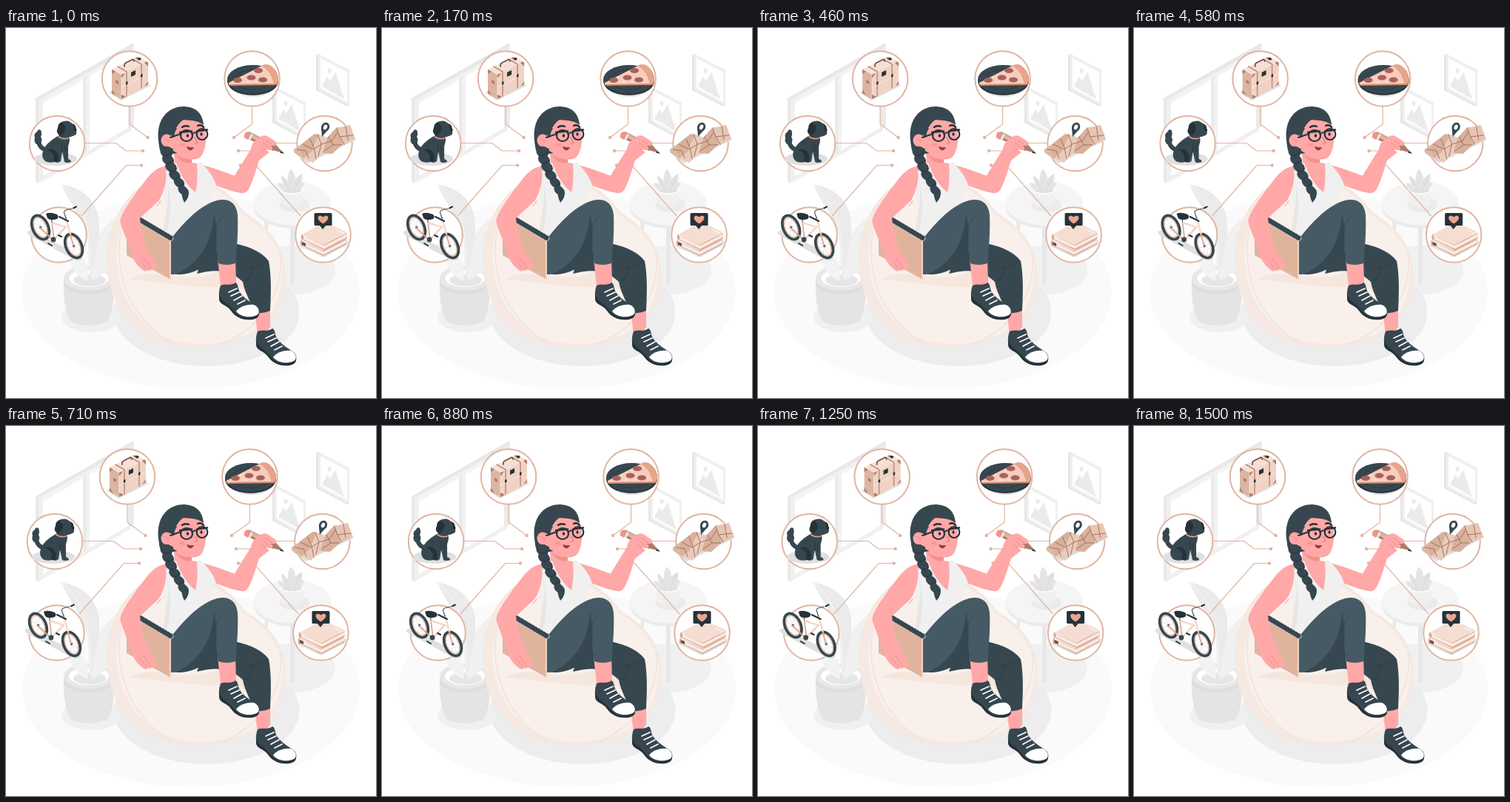
An HTML page that plays this animation: 500 px wide and 500 px high, repeating every 1540 ms.

```html
<!DOCTYPE html>
<html lang="en">
<head>
<meta charset="utf-8">
<title>Daydreaming</title>
<style>
  html, body { margin: 0; width: 100%; height: 100%; overflow: hidden; background: #fff; }
  svg { display: block; width: 100vw; height: 100vh; }
  .line { fill: none; stroke-linecap: round; stroke-linejoin: round; }
  .ring { fill: #fff; stroke: #e0b5a2; stroke-width: 2; }
  .wire { fill: none; stroke: #e0b5a2; stroke-width: 1.2; }
  .skin { fill: #ffa8a7; }
  .dark { fill: #37474f; }
  .ink { fill: #263238; }
  .tan { fill: #e0b49c; }
  .cream { fill: #f5ddd1; }
  .floor { fill: #e0e0e0; }
</style>
</head>
<body>
<svg viewBox="0 0 500 500">
  <defs>
    <g id="picture">
      <path fill="#e6e6e6" d="M419 37l3-2 42 22v48l-3 1-42-22z"/>
      <path fill="#f0f0f0" d="M422 35l42 22v48l-42-22z"/>
      <path fill="#fff" d="M425 41l36 19v40l-36-19z"/>
      <path fill="#ebebeb" d="M427 79l7-13 4 5 7-12 12 37z"/>
      <ellipse fill="#ebebeb" cx="437" cy="58" rx="2.6" ry="3.4"/>
    </g>
    <g id="shoe">
      <path class="dark" d="M290 348c6-3 14 1 20-4c4 1 3 8 6 13c6 9 17 15 24 20c5 7 2 15-7 16.500c-13 1.500-22-3-28-11c-6-9-16-11-17-18c-.5-6 0-12 2-16.500z"/>
      <path class="ink" d="M288 360c2 9 12 12 18 20c7 10 17 13 28 10c4-1 7-3 7.500-6c2 6-3 9-8.500 10c-13 1.500-23-3-29-12c-6-8-15-8-16-15z"/>
      <path fill="#fff" d="M311 383c3-5 13-10 24-9c7 3 9 11 4 14c-9 4-21 3-28-5z"/>
      <path class="line" stroke="#fff" stroke-width="1.800" d="M301 357l11-5M304 362l11-5M308 368l11-6M313 373l10-5"/>
    </g>
    <g id="wheel">
      <ellipse rx="10.500" ry="17" fill="#fff" fill-opacity=".8" stroke="#37474f" stroke-width="3.800"/>
      <ellipse rx="8" ry="14" fill="none" stroke="#e6bfad" stroke-width="1.400"/>
      <path class="line" stroke="#cfd3d5" stroke-width=".5" d="M0-14V14M-8 0H8M-6-10L6 10M6-10L-6 10"/>
      <circle class="dark" r="1.600"/>
    </g>
    <g id="book">
      <path fill="#d3a48f" d="M399 288l29 13 32-16v7l-31 16-30-15z"/>
      <path fill="#fbeae1" d="M401 289l28 13 31-16v4.500l-31 16-28-13z"/>
      <path class="cream" d="M399 287l31-17 30 14-31 17z"/>
      <path class="line" stroke="#c48f78" stroke-width="1" d="M399 287q-2 4 0 7"/>
    </g>
  </defs>

  <!-- room -->
  <ellipse cx="250" cy="356.500" rx="228" ry="131.500" fill="#fafafa"/>
  <g>
    <path fill="#fff" d="M44 96L172 25V134L44 206z"/>
    <path fill="#f3f3f3" d="M40 95L169 23l4 2v6L49 102z"/>
    <path fill="#e8e8e8" d="M40 95l4 2v113l-4-2z"/>
    <path fill="#f0f0f0" d="M44 97l6-3v106l119-67v6L44 210z"/>
    <path fill="#e8e8e8" d="M40 95L170 21l3 1v4L44 97z"/>
    <path fill="#ebebeb" d="M104 66l8-4v104l-8 5z"/>
    <path fill="#f3f3f3" d="M109 64l4-2v104l-4 2z"/>
    <path fill="#ebebeb" d="M165 29l8-4v108l-8 4z"/>
  </g>
  <use href="#picture"/>
  <use href="#picture" x="-59" y="44"/>

  <ellipse cx="388" cy="327" rx="57" ry="33" fill="#f0f0f0"/>
  <ellipse cx="271" cy="384" rx="125.500" ry="73" fill="#ededed"/>
  <ellipse cx="115" cy="391" rx="40" ry="20" fill="#f0f0f0"/>

  <!-- table -->
  <g>
    <path fill="#e8e8e8" d="M350 257h5l-4 54-4-1zM421 256h5l7 48-4 1zM384 262h6v84q-3 2-6 0z"/>
    <path fill="#ebebeb" d="M335 237h104v5c-2 38-102 38-104 0z"/>
    <ellipse cx="387" cy="237" rx="52" ry="29.500" fill="#f5f5f5"/>
    <ellipse cx="390" cy="239" rx="20" ry="10" fill="#ebebeb"/>
    <path fill="#f0f0f0" d="M370 219h33l-2 19c-6 5-23 5-29 0z"/>
    <ellipse cx="386.500" cy="219" rx="16.500" ry="6" fill="#fafafa"/>
    <ellipse cx="386.500" cy="219" rx="13" ry="4" fill="#e0e0e0"/>
    <path fill="#e0e0e0" d="M385 220c-9-5-13-13-13-21c7 4 11 11 13 21zM388 220c-1-12 4-19 12-23c2 10-3 19-12 23z"/>
    <path fill="#e4e4e4" d="M386 221c-7-10-7-23-1-31c8 8 9 21 1 31zM380 220c-9-1-12-6-12-11c6 1 11 5 12 11zM391 220c2-7 6-11 12-12c0 6-5 11-12 12z"/>
  </g>

  <!-- floor plant -->
  <g>
    <path fill="#e4e4e4" d="M78 338c-1 26 2 46 8 57c9 9 43 9 52 0c7-12 9-34 7-57z"/>
    <path fill="#dedede" d="M78 339h67l-1 11c-12 14-52 14-65 0z"/>
    <ellipse cx="111.500" cy="338" rx="33.500" ry="17" fill="#e8e8e8"/>
    <ellipse cx="112" cy="338" rx="27" ry="12" fill="#fff"/>
    <ellipse cx="113" cy="341" rx="22" ry="8" fill="#e6e6e6"/>
    <path fill="#f0f0f0" d="M117 342c-8-32 4-72 40-91c3 34-7 72-40 91z"/>
    <path fill="#f3f3f3" d="M110 342c-16-7-27-23-27-43c20 4 31 21 27 43z"/>
    <path fill="#ebebeb" d="M75 212c27 2 49 21 51 51c1 27-4 53-12 79c-5-23 4-54-13-84c-8-14-18-28-26-46z"/>
    <path class="line" stroke="#f8f8f8" stroke-width="1" d="M77 214c28 22 39 58 37 122M152 258c-24 24-33 50-34 78"/>
  </g>

  <!-- thoughts -->
  <g id="thoughts">
    <g class="wire">
      <path d="M167 105V130L191.500 148M332.500 105V130L308 148M106 155.500H148.500L162 166H185M393 155.500H351.500L338 166H314M102 254L162.500 185.500H183M398 254L337.500 185.500H317"/>
    </g>
    <g fill="#e0b5a2">
      <circle cx="191.500" cy="148" r="2.200"/><circle cx="308" cy="148" r="2.200"/>
      <circle cx="185" cy="166" r="2.200"/><circle cx="314" cy="166" r="2.200"/>
      <circle cx="183" cy="185.500" r="2.200"/><circle cx="317" cy="185.500" r="2.200"/>
    </g>
    <g class="ring">
      <circle cx="167" cy="68.500" r="37.300"/><circle cx="332.500" cy="68.500" r="37.300"/>
      <circle cx="69" cy="156" r="37.300"/><circle cx="430.500" cy="156" r="37.300"/>
      <circle cx="71.500" cy="279.500" r="37.300"/><circle cx="428.500" cy="279.500" r="37.300"/>
    </g>

    <!-- suitcase -->
    <path class="floor" d="M139 87l16 11 40-20-8-7z"/>
    <path fill="#dcb5a2" d="M143 57q0-2 2-1l11 7v33l-11-6q-2-1-2-3z"/>
    <path fill="#f0d3c5" d="M156 63l33-17q3-1 3 2v27q0 2-2 3l-34 18z"/>
    <path fill="#f5e0d5" d="M143 56l32-16q3-1 6 0l10 5-35 18z"/>
    <path class="line" stroke="#c0907c" stroke-width="1.600" d="M151 52l12 7v33M171 42l12 7v32"/>
    <path class="line" stroke="#fbeee7" stroke-width=".8" d="M156 64v31M157 80l34-18"/>
    <path fill="#b07c68" d="M156 63l5-2-5 7zM187 47q4-3 5 0v5zM156 90v6l6-3zM187 79l5-7v4zM143 56l5 3-5 3zM143 83v5l5 3zM174 40q4-1 7 0l-3 3zM148 70l4 2v4l-4-2z"/>
    <path class="line" stroke="#6f4d43" stroke-width="1.700" d="M160 52v-2q0-2 2-3l8-4q2-1 3 1v1"/>
    <path class="ink" d="M169 60l6-3v6l-6 3zM177 41l4-1 2 2-3 2zM162 73l2.500-1v4l-2.500 1zM182 63l2.500-1v4l-2.500 1z"/>

    <!-- pizza -->
    <ellipse cx="334" cy="75" rx="31" ry="18" class="floor"/>
    <path class="ink" d="M299 69h69v3c-2 25-67 25-69 0z"/>
    <ellipse class="dark" cx="333.500" cy="69.500" rx="34.500" ry="19.500"/>
    <ellipse cx="333.500" cy="70" rx="25" ry="13.500" fill="none" stroke="#2d3a41" stroke-width="1"/>
    <path fill="#d78f75" d="M301 74l45-23q5-3 10-1q11 6 12 19q0 5-2 8l-63 1q-3-1-2-4z"/>
    <path fill="#f7cdbb" d="M301 74l45-23q12 7 16 24l-59 1q-3 0-2-2z"/>
    <path fill="#e9a489" d="M345 51q7-4 13 1q9 7 10 19q-2 5-6 4q-3-17-17-24z"/>
    <g fill="#a8625e">
      <ellipse cx="313" cy="70.500" rx="6" ry="3.500"/>
      <ellipse cx="331.500" cy="67" rx="6" ry="3.600"/>
      <ellipse cx="341" cy="57.500" rx="6" ry="3.600"/>
      <ellipse cx="347" cy="70" rx="6" ry="3.600"/>
    </g>
    <path class="line" stroke="#fff1ea" stroke-width="1" d="M318 67l3-1M324 73l5 0M333 61l2-1M337 73l2 0"/>

    <!-- dog -->
    <ellipse class="floor" cx="67" cy="177" rx="29" ry="9"/>
    <path class="line" stroke="#37474f" stroke-width="6" d="M57 166c-8-2-13-7-13-14"/>
    <path class="dark" d="M41 157q-4-4-2-9q-2-5 3-8q1-4 5-2q2 5 0 9q3 5-1 10z"/>
    <path class="dark" d="M70 146c5-3 12-2 15 1c2 5 0 9-1 13l0 17q4 1 4 4q-6 2-9 0l-3-14-2 13q-3 3-8 1q-8 2-13-1q-6-5-3-14q3-10 20-20z"/>
    <path class="dark" d="M71 132q1-5 7-6q7-2 11 3q3 1 5 5q2 3 1 6q1 3-2 5q-6 3-13 3q-8 0-9-7z"/>
    <path class="ink" d="M76 128q-6 0-6 7q-3 5 1 9q2 3 6-1q4-5 3-10zM88 128q4 3 3 9l3 1q1-5-1-7zM56 165q7-4 12 2t2 14q-6 1-6-3 3-9-8-13z"/>
    <path class="line" stroke="#e0a08c" stroke-width="1.800" d="M71 147q6 4 13 2"/>
    <circle cx="94" cy="138" r="1.300" fill="#111b20"/>
    <path class="line" stroke="#263238" stroke-width=".8" d="M80 158v9M76 156v12M62 158l3-3"/>

    <!-- map -->
    <path class="floor" d="M391 170l17 13 65-32-6-6z"/>
    <path fill="#dcb8a5" d="M389 164l10-7 13 3-10 17-13-9z"/>
    <path fill="#e9cbbb" d="M412 160l9-17 13 5-6 21-13 13-13-6z"/>
    <path fill="#d9b09b" d="M399 157l18-14 6 1-11 24-10 8-4-10zM434 148l13-14 10 2-2 21-14 13-13-1z"/>
    <path fill="#e6c5b4" d="M447 135l18-4 7 19-17 8z"/>
    <path class="line" stroke="#9b6b57" stroke-width=".9" d="M393 164l12 2 4 10M401 157l14 7 10-6M411 150l5 12 3 15M421 144l5 13-4 16M426 157l14-4 8-12M436 147l6 11 12 0M447 136l4 11 18-2M451 147l6 10M459 133l3 18M430 166l12-8"/>
    <ellipse cx="431.500" cy="134" rx="4" ry="5" transform="rotate(25 431.500 134)" fill="#fff" stroke="#37474f" stroke-width="3"/>
    <path class="dark" d="M426 136l7 4-6 7z"/>

    <!-- bike -->
    <path class="floor" d="M28 276q4-4 9-1l66 33q2 6-5 6q-5 0-13-5l-54-29z"/>
    <use href="#wheel" transform="translate(46.500 269.500) rotate(-24)"/>
    <use href="#wheel" transform="translate(91.500 294.500) rotate(-24)"/>
    <path class="line" stroke="#e0a892" stroke-width="1.800" d="M46 270l18 17 17-18-19-6 3 24M81 256l10 38"/>
    <path class="line" stroke="#f5ddd1" stroke-width="2" d="M63 264l17 5-13 14M82 262l5 16"/>
    <path class="line" stroke="#455a64" stroke-width="1.200" d="M62 262l-1-6M81 257l-2-6q-2-3 2-5l8-2"/>
    <path class="ink" d="M54 251q5-3 15 1q3 3 0 6q-9 3-13-1z"/>
    <path class="line" stroke="#263238" stroke-width="2" d="M91 243.500l4-2M72 255l12 6M57 291l5 3M71 280l4 2"/>
    <circle class="dark" cx="64" cy="286" r="3.400"/>

    <!-- books -->
    <path class="floor" d="M395 294l34 16 36-19-5-5z"/>
    <use href="#book"/>
    <use href="#book" x="1" y="-8"/>
    <path fill="#6f4d43" d="M400 289l5 2v4l-5-2z"/>
    <path class="line" stroke="#fff" stroke-width="1" d="M447 273l9 4"/>
    <path class="ink" d="M418 250h21q1.500 0 1.500 1.500v14q0 1.500-1.500 1.500h-7l-4 5-4-5h-6q-1.500 0-1.500-1.500v-14q0-1.500 1.500-1.500z"/>
    <path fill="#e9a58f" d="M428.500 264.500c-12-7-6-14 0-9c6-5 12 2 0 9z"/>
  </g>

  <!-- beanbag -->
  <path fill="#f6e9e2" d="M211 198C166 214 137 260 136 306c0 52 20 94 62 115c42 17 106 13 140-9c34-23 45-66 37-101c-7-29-31-49-52-61c-24-34-63-59-112-53z"/>
  <path fill="#f9f0ec" d="M208 200c-39 19-57 62-59 103c0 53 24 97 70 117c37 12 86 8 116-11c33-23 43-63 37-94c-7-29-29-48-50-61c-24-33-66-58-114-54z"/>
  <path fill="#f5e6de" d="M166 340c18-11 37-8 56-5c35 6 68-3 92-17l24 68c-7-23-19-38-34-38c-42 7-85-5-138-8z"/>
  <path class="line" stroke="#f0dfd6" stroke-width="1.200" d="M196 206c-31 24-45 61-43 102c3 49 25 91 73 119M371 306c4 48-22 99-82 122"/>

  <!-- back leg -->
  <path class="skin" d="M335 378l22-2 0 28q-7 10-17 9z"/>
  <use href="#shoe" x="50" y="62"/>
  <path class="dark" d="M258 332l12-32 43-8c16 4 34 11 42 23c4 21 3 45 2 67q-10 5-22 2c-4-14-12-25-15-41c-14-14-33-19-62-11z"/>
  <path class="line" stroke="#2b3940" stroke-width="1" d="M328 325c8-1 17-5 23-9M324 343c6-5 8-11 8-18"/>

  <!-- torso and raised arm -->
  <path class="skin" d="M226 160l25 14v8c9 1 22 5 34 9l22 8q3 1 4-3l21-34q14-2 24 6l-14 11c-5 15-9 31-15 40q-3 5-10 4c-12-2-24-7-35-11l-24 32-41-16-6-38q4-6 17-9z"/>
  <path fill="#f28f8f" d="M229 171c8 5 15 7 22 5v6c-8 2-16-2-22-11z"/>
  <path fill="#f0f0f0" d="M215 188l15-6c6 17 15 32 26 40c3-11 3-26 2-39l4-2c9 7 18 19 22 31c-8 9-10 19-9 32l-9 43-46 28-9-32c3-19 6-32 3-49z"/>
  <path fill="#e6e6e6" d="M215 190c3 17 6 31 3 49l-6 38 2 9c6-16 9-36 8-55zM275 244c-10 10-22 21-31 36l25-10z"/>

  <!-- front leg -->
  <path class="skin" d="M286 312h24l1 32c-4 8-14 9-21 4z"/>
  <use href="#shoe"/>
  <path fill="#455a64" d="M222 286c18-23 39-46 63-53c15-4 27 3 28 20c1 23-1 44-3 65q-12 4-23 0l-3-18c-10 18-28 34-62 33z"/>
  <path class="dark" d="M287 318l-3-20c1-17 1-32-3-47c-2 33-15 65-52 82c27 1 44-12 55-30z"/>
  <path class="line" stroke="#37474f" stroke-width="1" d="M283 292c-1-15 1-27 7-35"/>

  <!-- notebook -->
  <path fill="#f0d3c5" d="M219 285l4 2v52l-2 1z"/>
  <path class="tan" d="M176 259l45 27v53l-58-32v-30z"/>
  <g class="line" stroke-linecap="butt">
    <path stroke="#fff" stroke-width="7" stroke-dasharray="2.600 1.800" d="M179 258l44 26"/>
    <path stroke="#37474f" stroke-width="7" stroke-dasharray=".7 3.700" d="M180 258.500l43 25.500"/>
  </g>

  <!-- resting arm -->
  <path class="skin" d="M214 187c-11 2-19 10-27 21c-11 14-23 30-31 46q-3 7 0 14c5 13 9 24 13 31c1 12 7 22 16 28q4 3 6 0q4 2 6-1q4 1 5-2q3-2 0-6c-5-11-11-19-15-28c-2-13-5-22-6-33l25-23c8-12 12-28 10-47z"/>
  <path class="line" stroke="#f28f8f" stroke-width="1" d="M181 314l10 13M186 311l11 15M209 234c-1 2-3 4-5 6"/>

  <!-- pencil and hand -->
  <path fill="#a9705c" d="M328 140l37 18-4 8-37-18z"/>
  <path fill="#e0b49c" d="M327 140.500l38 18-2.500 5-38-18z"/>
  <path fill="#f0938d" d="M325 140l6 3-4 8-5-3q-1-5 3-8z"/>
  <path fill="#e8e8e8" d="M331 143l3 1-4 8-3-1z"/>
  <path fill="#b07c68" d="M356 155l9 3 10 11-15-4-6-3z"/>
  <path class="ink" d="M372 166l4 4-6-1.500z"/>
  <path class="skin" d="M331 164c1-7 5-13 11-16q5-4 11-2l9 6q5 3 3 6q-3 2-7 1q4 4 1 6q-4 1-7-1q2 5-2 8q-7 4-14 2z"/>
  <path class="line" stroke="#f28f8f" stroke-width="1" d="M351 151l9 7M347 155l9 7M344 158l7 7"/>

  <!-- head -->
  <path class="dark" d="M206 152c-3-27 11-46 35-46c16 1 24 9 26 24l-30 38-22 4q-8-9-9-20z"/>
  <path class="skin" d="M238 124c14 1 27 1 31 11c2 12 2 28-5 38c-5 6-15 6-24 1l-14-8v-20c1-9 6-15 12-22z"/>
  <path class="dark" d="M242 122c-9 4-14 12-15 25l-2 8-4-5-8 0c0-22 8-36 26-35q16-1 28 14c-8-5-16-6-25-7z"/>
  <path class="line" stroke="#263238" stroke-width="1" d="M239 124q-7 4-11 14"/>
  <ellipse class="skin" cx="217" cy="152" rx="7.500" ry="8.500"/>
  <path class="skin" d="M217 146l10-2v20l-9-4z"/>
  <path class="dark" d="M224 148q-3-9 3-16l4 4q-4 6-4 12z"/>
  <path class="line" stroke="#f28f8f" stroke-width="1.200" d="M213 150q5-2 7 5"/>
  <g class="line" stroke="#263238">
    <path stroke-width="2.400" d="M238 134q4-3 9-1M259 132q5-2 8 2"/>
    <path stroke-width="2" d="M222 148l14-5M252 143q3-3 6-1"/>
    <ellipse cx="244" cy="145.500" rx="8" ry="7.500" stroke-width="2.200"/>
    <ellipse cx="265" cy="143.500" rx="7.300" ry="7.500" stroke-width="2.200"/>
    <path stroke-width="2.600" d="M235 141l16-1.500M258 139.500l14-2"/>
  </g>
  <ellipse class="ink" cx="245.500" cy="145.500" rx="1.700" ry="2.200"/>
  <ellipse class="ink" cx="264" cy="143.500" rx="1.600" ry="2.200"/>
  <path class="line" stroke="#e77f80" stroke-width="1.200" d="M255 148l4 7q-1 2-4 1"/>
  <ellipse cx="238" cy="158" rx="4" ry="2.500" fill="#ff9696"/>
  <path fill="#8f3c40" d="M244 160q5 2 10 1q-2 5-6 4q-3-1-4-5z"/>

  <!-- braid -->
  <g class="dark">
    <path d="M207 150q1 8 8 11l10 2-1 12-12-1q-7-12-5-24z"/>
    <ellipse cx="217" cy="167" rx="8.500" ry="7"/>
    <ellipse cx="219" cy="178" rx="8.500" ry="6.500" transform="rotate(30 219 178)"/>
    <ellipse cx="223" cy="188" rx="8.500" ry="6.500" transform="rotate(35 223 188)"/>
    <ellipse cx="228" cy="199" rx="8.300" ry="6.300" transform="rotate(35 228 199)"/>
    <ellipse cx="234" cy="209" rx="8" ry="6" transform="rotate(40 234 209)"/>
    <ellipse cx="239" cy="219" rx="7.500" ry="5.500" transform="rotate(45 239 219)"/>
    <path d="M237 219q0 9 4 17q6-6 6-13q0-5-4-7z"/>
  </g>
  <path class="line" stroke="#263238" stroke-width="1" d="M213 172q6 1 10-3M217 183q6 1 9-4M221 194q6 1 9-4M227 204q5 0 8-4M233 214q5-1 7-4"/>
</svg>
<script>
  const thoughts = document.getElementById('thoughts');
  const shake = [0, -1, 2, -4, 4, -4, 4, -4, 2, -1, 0];
  const LOOP = 1540, STEPS = 36, STEP_MS = 1500 / STEPS;
  const PHASE = 0.0185, REST = 0.2;

  function offset(step) {
    const p = (step / STEPS + PHASE) % 1 * 10;
    const k = Math.floor(p);
    return shake[k] + (shake[k + 1] - shake[k]) * (p - k);
  }

  const start = performance.now();
  function draw(now) {
    const t = Math.max(0, now - start) % LOOP;
    const step = Math.min(STEPS, Math.floor((t + 5) / STEP_MS));
    thoughts.setAttribute('transform', `translate(${(offset(step) + REST).toFixed(2)} 0)`);
    requestAnimationFrame(draw);
  }
  draw(start);
</script>
</body>
</html>
```
